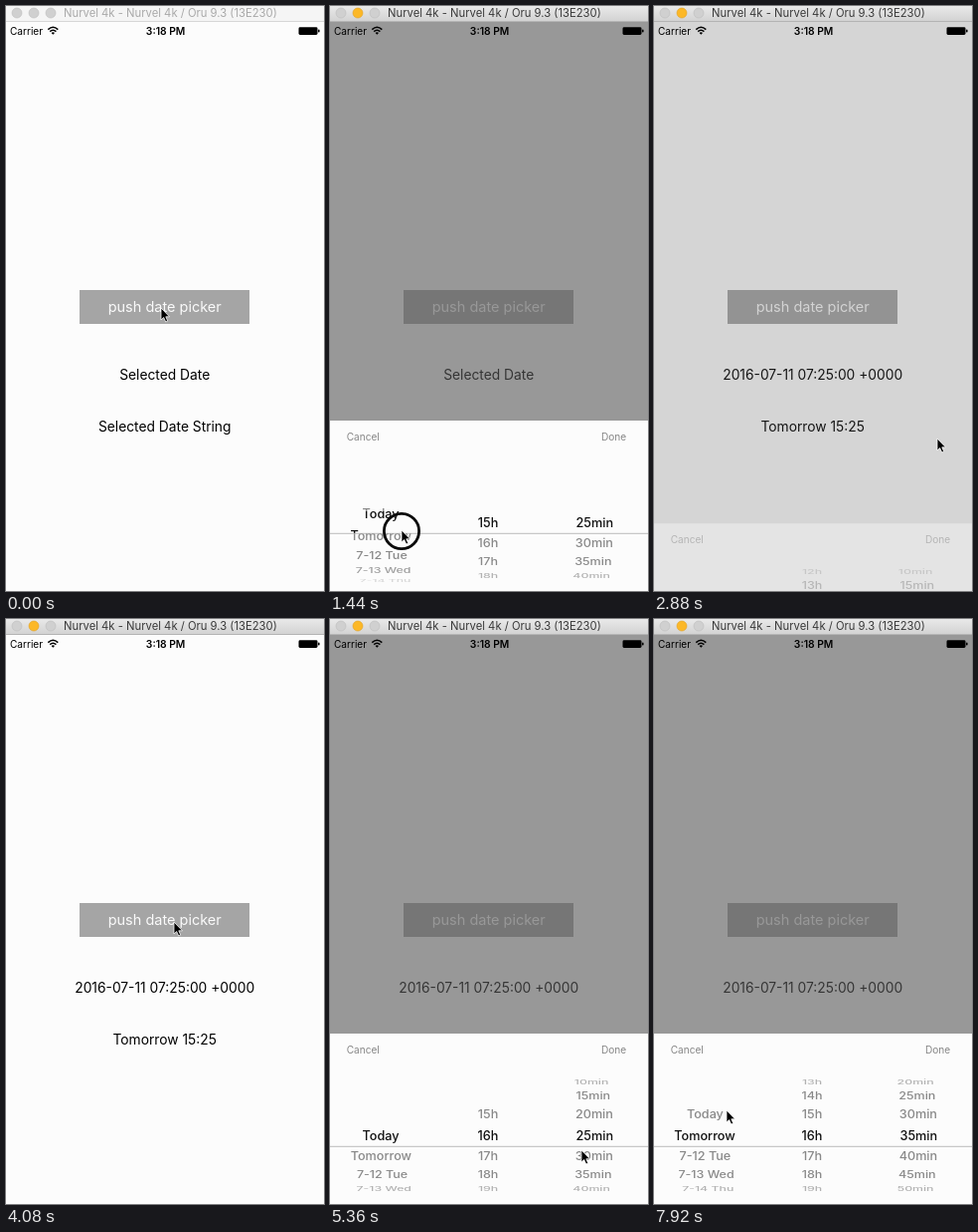
These frames come from a looping animation (320 px wide and 587 px high, 8000 ms). An HTML page:

```html
<!DOCTYPE html>
<html lang="en">
<head>
<meta charset="utf-8">
<title>Date picker</title>
<style>
  html, body { margin: 0; width: 100%; height: 100%; overflow: hidden; background: #fcfcfc; }
  svg { display: block; width: 100%; height: 100%; }
  text { font-family: Inter, "Open Sans", sans-serif; }
  .mid { text-anchor: middle; }
  .label { font-size: 13.8px; }
  .bar { font-size: 10.1px; fill: #868686; }
  .wheel text { font-size: 12.7px; font-weight: 500; text-anchor: middle; }
</style>
</head>
<body>
<svg viewBox="0 0 320 587" preserveAspectRatio="none">
  <defs>
    <linearGradient id="chrome" x1="0" y1="0" x2="0" y2="1">
      <stop offset="0" stop-color="#e9e9e9"/>
      <stop offset="1" stop-color="#d2d2d2"/>
    </linearGradient>
    <clipPath id="inside"><rect y="91" width="320" height="22"/></clipPath>
    <clipPath id="outside"><path d="M0 40H320V91H0ZM0 113H320V171H0Z"/></clipPath>
  </defs>

  <rect width="320" height="587" fill="#fcfcfc"/>
  <rect x="74" y="285" width="171" height="34" fill="#a5a5a5"/>
  <text class="mid" x="159.7" y="307" font-size="14.5" fill="#fafafa">push date picker</text>
  <text class="mid label" id="date" x="159.7" y="375"/>
  <text class="mid label" id="summary" x="159.7" y="426.5"/>
  <rect id="dim" y="15" width="320" height="572" fill="#575757"/>

  <text x="4" y="28.6" font-size="10.1">Carrier</text>
  <g fill="none" stroke="#000" stroke-width="1.5">
    <path d="M42.3 23.6Q47.3 19 52.3 23.6M44.2 25.6Q47.3 22.8 50.4 25.6"/>
    <path d="M45.6 26.9Q47.3 25.6 49 26.9L47.3 28.7Z" fill="#000" stroke="none"/>
  </g>
  <text class="mid" x="160.6" y="28.6" font-size="10.3" font-weight="600">3:18 PM</text>
  <rect x="294.5" y="21.3" width="19" height="7.6" rx="1.4"/>
  <rect x="314" y="23.6" width="1.6" height="3" rx=".8"/>

  <rect id="titleBar" width="320" height="15.5"/>
  <path id="edge" d="M0 15.5H320"/>
  <g id="lights" stroke-width=".6">
    <circle cx="11" cy="7" r="5"/><circle cx="28" cy="7" r="5"/><circle cx="45" cy="7" r="5"/>
  </g>
  <text id="title" x="58" y="11" font-size="11.25">Nurvel 4k - Nurvel 4k / Oru 9.3 (13E230)</text>

  <g id="panel">
    <rect width="320" height="173" fill="#fcfcfc"/>
    <text class="bar" x="16.7" y="20.2">Cancel</text>
    <text class="bar" x="273" y="20.2">Done</text>
    <g class="wheel" id="grey" fill="#898989" clip-path="url(#outside)"/>
    <g class="wheel" id="dark" fill="#111" clip-path="url(#inside)"/>
    <path d="M0 113.3H320" stroke="#ababab" stroke-width=".8"/>
  </g>

  <g id="pointer">
    <circle id="ring" r="17.6" cy="1" fill="none" stroke="#0a0a0a" stroke-width="2.8"/>
    <path d="M0 0V12L2.7 9.5L4.7 14L6.7 13.1L4.8 8.8H8.5Z" fill="#000"
          stroke="#fff" stroke-opacity=".85" stroke-width=".9"/>
  </g>
</svg>
<script>
const LOOP = 8000, STEP = 80;
const DAYS = ['Today', 'Tomorrow', '7-12 Tue', '7-13 Wed', '7-14 Thu', '7-15 Fri'];
const $ = id => document.getElementById(id);
const clamp = v => Math.max(0, Math.min(1, v));
const smooth = v => v * v * (3 - 2 * v);
const ramp = (t, from, to) => clamp((t - from) / (to - from));
const within = (t, from, to) => t >= from && t < to;

// Eased value of column `col` in a list of [time, value...] keys.
function track(keys, t, col = 1) {
  let i = keys.findIndex(k => k[0] > t);
  if (i < 0) return keys[keys.length - 1][col];
  if (i === 0) return keys[0][col];
  const a = keys[i - 1], b = keys[i];
  return a[col] + (b[col] - a[col]) * smooth(ramp(t, a[0], b[0]));
}

const POINTER = [
  [800, 156, 303], [1280, 73, 535], [1360, 73, 535], [1440, 72, 526], [1600, 72, 514],
  [1760, 72, 514], [2480, 285, 434], [3360, 285, 434], [4000, 169, 304], [4320, 169, 304],
  [4720, 163, 537], [4800, 163, 537], [5120, 163, 516], [5360, 253, 533], [5440, 253, 533],
  [6080, 255, 492], [6320, 255, 492], [6480, 250, 497], [6560, 250, 497], [7200, 73, 528],
  [7360, 73, 528], [7840, 73, 493]
];
const DAY = [[1360, 0], [1440, .38], [1600, 1], [4080, 1], [4160, 0], [7360, 0], [7840, 1]];
const HOUR = [[4800, 15], [5120, 16]];
const MINUTE = [[5440, 5], [6240, 7]];
const PRESSES = [[320, 400], [1360, 1600], [2640, 2720], [4160, 4240], [4800, 5120],
  [5440, 6080], [7360, 7840]];

// Rows of one column, wrapped round a horizontal drum.
function drum(x, pos, first, last, name) {
  let rows = '';
  for (let i = Math.max(first, Math.ceil(pos - 4)); i <= Math.min(last, pos + 4); i++) {
    const angle = (i - pos) * Math.PI / 9, depth = Math.cos(angle);
    if (depth < .25) continue;
    const scale = 1 - .06 * (1 - depth);
    const cx = 160 + (x - 160) * scale, cy = 102 + 61.5 * Math.sin(angle);
    rows += `<text transform="translate(${cx} ${cy}) scale(${scale} ${depth})" y="4.5"
      opacity="${clamp((depth - .1) * 1.6)}">${name(i)}</text>`;
  }
  return rows;
}

function openness(t) {
  if (t < 2640) return smooth(ramp(t, 440, 720));
  if (t < 4160) return 1 - ramp(t, 2680, 2960) ** 1.5;
  return smooth(ramp(t, 4200, 4480));
}

function setTitle(active) {
  $('titleBar').setAttribute('fill', active ? 'url(#chrome)' : '#f5f5f5');
  $('edge').setAttribute('stroke', active ? '#b4b4b4' : '#d6d6d6');
  $('title').setAttribute('fill', active ? '#3a3a3a' : '#a9a9a9');
  [...$('lights').children].forEach((dot, i) => {
    const lit = active && i === 1;
    dot.setAttribute('fill', lit ? '#fcb827' : '#d0d0d0');
    dot.setAttribute('stroke', lit ? '#dfa023' : '#bcbcbc');
  });
}

function render(t) {
  const open = openness(t), picked = t >= 2640;
  const later = within(t, 1760, 4160) || t >= 7840;
  const allMinutes = within(t, 1760, 4160) || t >= 5200;

  setTitle(t >= 320);
  $('date').textContent = picked ? '2016-07-11 07:25:00 +0000' : 'Selected Date';
  $('summary').textContent = picked ? 'Tomorrow 15:25' : 'Selected Date String';
  $('dim').setAttribute('opacity', .6 * open);
  $('panel').setAttribute('opacity', open);
  $('panel').setAttribute('transform', `translate(0 ${416 + 171 * (1 - open)})`);

  const rows = drum(51, track(DAY, t), 0, 5, i => DAYS[i])
    + drum(159, track(HOUR, t), later ? 0 : 15, 23, i => i + 'h')
    + drum(266.3, track(MINUTE, t), allMinutes ? 0 : 5, 11, i => i * 5 + 'min');
  $('grey').innerHTML = $('dark').innerHTML = rows;

  $('pointer').setAttribute('transform',
    `translate(${track(POINTER, t, 1)} ${track(POINTER, t, 2)})`);
  $('ring').setAttribute('opacity', PRESSES.some(p => within(t, ...p)) ? 1 : 0);
}

const start = performance.now();
let shown = -1;
function tick() {
  const t = Math.floor((performance.now() - start) % LOOP / STEP) * STEP;
  if (t !== shown) render(shown = t);
  requestAnimationFrame(tick);
}
tick();
</script>
</body>
</html>
```
